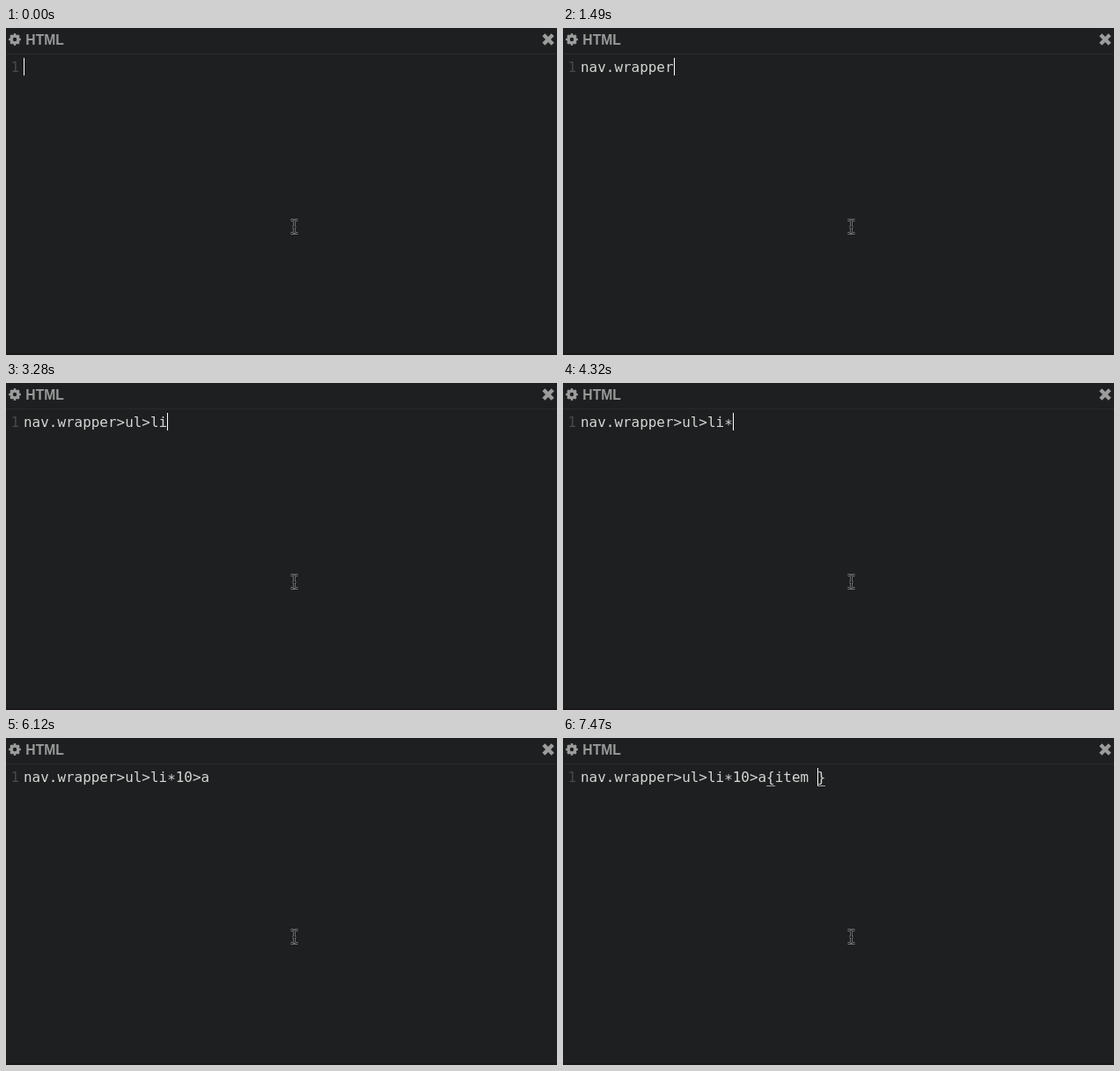
An HTML page for the animation above (8 s loop, 626x372 px).

```html
<!DOCTYPE html>
<html lang="en">
<head>
<meta charset="utf-8">
<title>Typing an abbreviation</title>
<style>
  html, body { margin: 0; width: 100%; height: 100%; overflow: hidden; background: #1d1f20; }
  svg { display: block; }
  .title { font: bold 15.7px "Liberation Sans", Arial, sans-serif; fill: #999; }
  .code { font: 15.95px "DejaVu Sans Mono", monospace; fill: #d6d6d4; white-space: pre; }
  .gutter { fill: #48494a; }
  .icon { fill: none; stroke: #9c9c9c; }
  .pointer { fill: none; }
</style>
</head>
<body>
<svg width="626" height="372" viewBox="0 0 626 372">
  <defs>
    <path id="beam" d="M323.5 218.5h2.5l1.5 1.5 1.5-1.5h2.5M327.5 220v12M323.5 233.5h2.5l1.5-1.5 1.5 1.5h2.5M325.5 226.5h4"/>
  </defs>
  <rect width="626" height="372" fill="#1d1f20"/>
  <rect y="29" width="626" height="1" fill="#292b2c"/>
  <rect y="370" width="626" height="2" fill="#1d1719"/>

  <g class="icon">
    <circle cx="10" cy="13" r="4" stroke-width="3.6"/>
    <circle cx="10" cy="13" r="5.8" stroke-width="2.2" pathLength="16" stroke-dasharray="1 1" stroke-dashoffset=".5"/>
    <path d="M610.8 7.8l10.4 10.4M621.2 7.8l-10.4 10.4" stroke-width="4.3"/>
  </g>
  <text class="title" x="22.3" y="19">HTML</text>

  <text class="code gutter" x="5.4" y="50">1</text>
  <text class="code" x="20" y="50"><tspan id="before"></tspan><tspan id="star" dy="3"></tspan><tspan id="after" dy="-3"></tspan></text>
  <g id="underlines" fill="#a8a8a7">
    <rect id="openLine" y="54" width="10" height="1"/>
    <rect id="closeLine" y="54" width="9" height="1"/>
  </g>
  <rect id="caret" y="34" width="1" height="20" fill="#fff"/>

  <g class="pointer">
    <use href="#beam" stroke="#737576" stroke-width="2.8"/>
    <use href="#beam" stroke="#151617"/>
  </g>
</svg>
<script>
const LOOP = 8000, START = 440, BEAT = 149.57;
const LEFT = 20, CHAR = 9.6;

// One part per beat: the keys typed, nothing for a pause, "_" for the caret blinking off.
const beats = '_|nav||.|wr|ap|p|er||||>|||ul||>|||li||||*|||1|0|||_|||>||a|||_||{||||_|i|te|m '.split('|');

const el = id => document.getElementById(id);
const set = (id, name, value) => el(id).setAttribute(name, value);
const show = (id, on) => set(id, 'visibility', on ? 'visible' : 'hidden');
const column = n => Math.round(LEFT + n * CHAR);

function draw(time) {
  const played = beats.slice(0, Math.max(0, Math.floor((time - START) / BEAT + 1.05)));
  const typed = played.join('').replaceAll('_', '');
  const openAt = typed.indexOf('{');
  const paired = openAt >= 0;
  const [before, after] = (paired ? typed + '}' : typed).split('*');
  el('before').textContent = before;
  el('star').textContent = after === undefined ? '' : '*';
  el('after').textContent = after ?? '';

  const x = column(typed.length);
  set('caret', 'x', x);
  show('caret', played.findLast(part => part) !== '_');
  show('underlines', paired);
  set('openLine', 'x', column(openAt));
  set('closeLine', 'x', x);
}

function frame() {
  draw(performance.now() % LOOP);
  requestAnimationFrame(frame);
}
frame();
</script>
</body>
</html>
```
